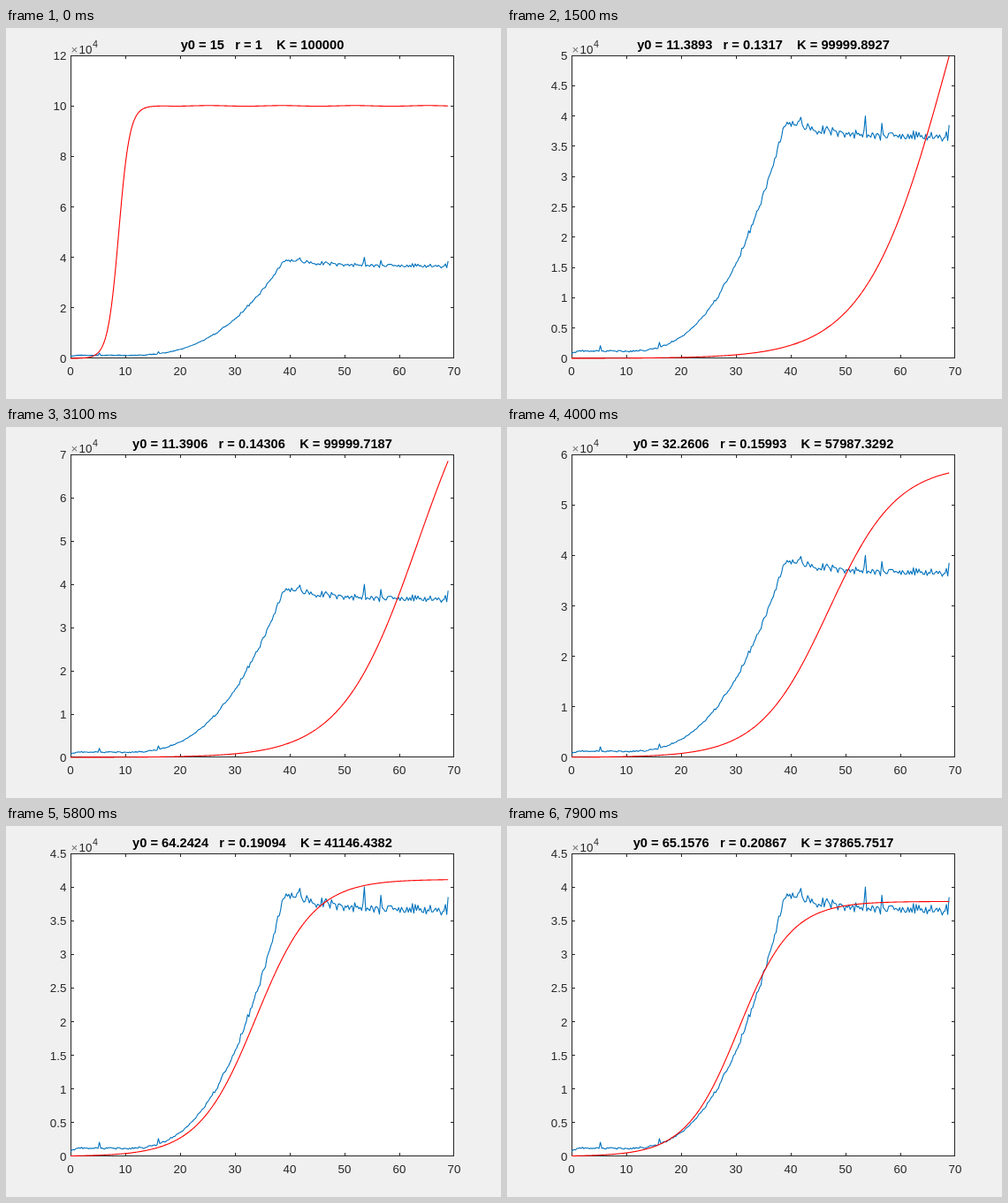
Recreate the animation shown at these times as an HTML page with a canvas. Size 560 by 420 pixels, loop 8 s.

```html
<!DOCTYPE html>
<html lang="en">
<head>
<meta charset="utf-8">
<title>Logistic curve fit</title>
<style>
html, body { margin: 0; width: 100%; height: 100%; overflow: hidden; background: #f0f0f0; }
canvas { display: block; width: 560px; height: 420px; }
</style>
</head>
<body>
<canvas id="plot"></canvas>
<script>
const canvas = document.getElementById("plot");
const ctx = canvas.getContext("2d");
const dpr = window.devicePixelRatio || 1;
canvas.width = 560 * dpr;
canvas.height = 420 * dpr;
ctx.scale(dpr, dpr);

const FONT = "Arial, 'Liberation Sans', sans-serif";
const INK = "#262626";
const LEFT = 73, RIGHT = 507, TOP = 31, BOTTOM = 374;
const T_END = 68.9, LOOP = 8000;
const xAt = t => LEFT + t / 70 * (RIGHT - LEFT);

// Key fits. `tries` holds the rejected trials of each iteration that leads there,
// `pow` spaces those iterations out.
const keys = [
  { p: [15, 1, 100000] },
  { p: [11.4213, 0.0051, 99999.9985], tries: [0] },
  { p: [11.3893, 0.1317, 99999.8927], tries: [0, 3], pow: .4 },
  { p: [11.390475, 0.1430556, 99999.8927], tries: [7] },
  { p: [11.3906, 0.14306, 99999.7187], tries: [1] },
  { p: [11.3927, 0.15103, 68004.1862], tries: [1] },
  { p: [58.3454, 0.17106, 45466.2579], tries: [2, 0, 0], pow: 2 },
  { p: [68.6127, 0.20567, 37945.0139], tries: [1, 0, 0, 0], pow: .4 },
  { p: [65.1576, 0.20867, 37865.7517], tries: [0, 0, 0], pow: 2 }
];

const mix = (a, b, u) => a.map((v, j) => v + (b[j] - v) * u);

// Each iteration: hold, nudge K for the gradient, then halve the step until it is accepted
function buildTimeline() {
  const steps = [{ at: 0, p: keys[0].p }];
  let time = 0, from = keys[0].p;
  for (let i = 1; i < keys.length; i++) {
    const { p, tries, pow = 1 } = keys[i];
    tries.forEach((rejected, n) => {
      const to = mix(keys[i - 1].p, p, ((n + 1) / tries.length) ** pow);
      steps.push({ at: time + 300, p: [from[0], from[1], from[2] * (1 + 1.49e-8)] });
      time += 400;
      for (let k = rejected; k > 0; k--, time += 100) {
        steps.push({ at: time, p: mix(from, to, 2 ** k) });
      }
      steps.push({ at: time, p: to });
      from = to;
    });
  }
  return steps;
}
const timeline = buildTimeline();

function makeRandom(seed) {
  return () => {
    seed = (seed * 1664525 + 1013904223) >>> 0;
    return seed / 4294967296;
  };
}

// Measured series in units of 10^4: power-law growth capped by a slowly sinking plateau
function trend(t) {
  const growth = .12 - .05 * Math.exp(-2 * t) + .0006 * Math.max(0, t - 10) ** 2.6;
  const plateau = 3.64 + .24 * Math.exp(-(t - 40) / 9);
  return (growth ** -24 + plateau ** -24) ** (-1 / 24);
}
const spikes = [
  [5.3, .21], [16.1, .265], [39.3, 3.9], [41.9, 3.98], [53.5, 4.001], [56.6, 3.88], [T_END, 3.85]
];

function buildData() {
  const random = makeRandom(41), n = 275;
  const points = [];
  for (let i = 0; i <= n; i++) {
    const t = T_END * i / n, v = trend(t);
    const noise = (random() + random() - 1) * (.015 + .023 * v);
    points.push([t, (v + noise) * 1e4]);
  }
  for (const [t, v] of spikes) points[Math.round(t / T_END * n)][1] = v * 1e4;
  return points;
}
const data = buildData();

function buildCurve([y0, r, K]) {
  const points = [];
  for (let i = 0; i <= 600; i++) {
    const t = T_END * i / 600;
    let y = K / (1 + (K / y0 - 1) * Math.exp(-r * t));
    // solver ripple once a steep curve has levelled off
    if (r > .6 && t > 18) y += 130 * Math.cos(2 * Math.PI * (t - 25.3) / 13.3);
    points.push([t, y]);
  }
  return points;
}

// Four decimals, or five significant digits below one
function num(v) {
  return String(Number(Math.abs(v) < 1 ? v.toPrecision(5) : v.toFixed(4)));
}

function text(str, x, y, size, align, color = INK, weight = "") {
  ctx.font = `${weight} ${size}px ${FONT}`;
  ctx.textAlign = align;
  ctx.fillStyle = color;
  ctx.fillText(str, x, y);
}

function line(points, top, color) {
  ctx.beginPath();
  for (const [t, v] of points) {
    ctx.lineTo(xAt(t), BOTTOM - v / top * (BOTTOM - TOP));
  }
  ctx.strokeStyle = color;
  ctx.lineWidth = 1.1;
  ctx.lineJoin = "round";
  ctx.stroke();
}

function bar(x, y, w, h) {
  ctx.fillStyle = INK;
  ctx.fillRect(x, y, w, h);
}

function drawAxes(top, step) {
  const w = RIGHT - LEFT, h = BOTTOM - TOP, tick = 4;
  ctx.fillStyle = "#fff";
  ctx.fillRect(LEFT, TOP, w, h);
  for (let v = 0; v <= 70; v += 10) {
    const x = Math.min(xAt(v), RIGHT - 1);
    // the outermost ticks are the box sides
    const full = v === 0 || v === 70;
    bar(x, TOP, 1, full ? h : tick);
    bar(x, BOTTOM - tick, 1, tick);
    text(v, xAt(v), 393, 13.333, "center");
  }
  for (let v = 0; v <= top; v += step) {
    const y = BOTTOM - v / top * h;
    const row = Math.min(Math.floor(y), BOTTOM - 1);
    const full = v === 0 || v === top;
    bar(LEFT, row, full ? w : tick, 1);
    bar(RIGHT - tick, row, tick, 1);
    text(v / 1e4, 68.4, y + 5, 13.333, "right");
  }
  text("×", 73.5, 28.5, 13.333, "left", "#6e6e6e");
  text("10", 82.5, 28.5, 13.333, "left");
  text("4", 98, 22, 10.667, "left");
}

function draw(p) {
  const curve = buildCurve(p);
  const peak = Math.max(40010, ...curve.map(c => c[1]));
  const step = peak <= 5e4 ? 5e3 : peak <= 1e5 ? 1e4 : 2e4;
  const top = Math.ceil(peak / step) * step;
  ctx.fillStyle = "#f0f0f0";
  ctx.fillRect(0, 0, 560, 420);
  drawAxes(top, step);
  line(data, top, "#0072bd");
  line(curve, top, "#f00");
  const title = `y0 = ${num(p[0])}   r = ${num(p[1])}    K = ${num(p[2])}`;
  text(title, 290, 24, 14.667, "center", "#000", "bold");
}

let shown = null;
function tick() {
  const now = performance.now() % LOOP;
  let current = timeline[0];
  for (const s of timeline) if (s.at <= now) current = s;
  if (current !== shown) {
    shown = current;
    draw(current.p);
  }
  requestAnimationFrame(tick);
}
tick();
</script>
</body>
</html>
```
